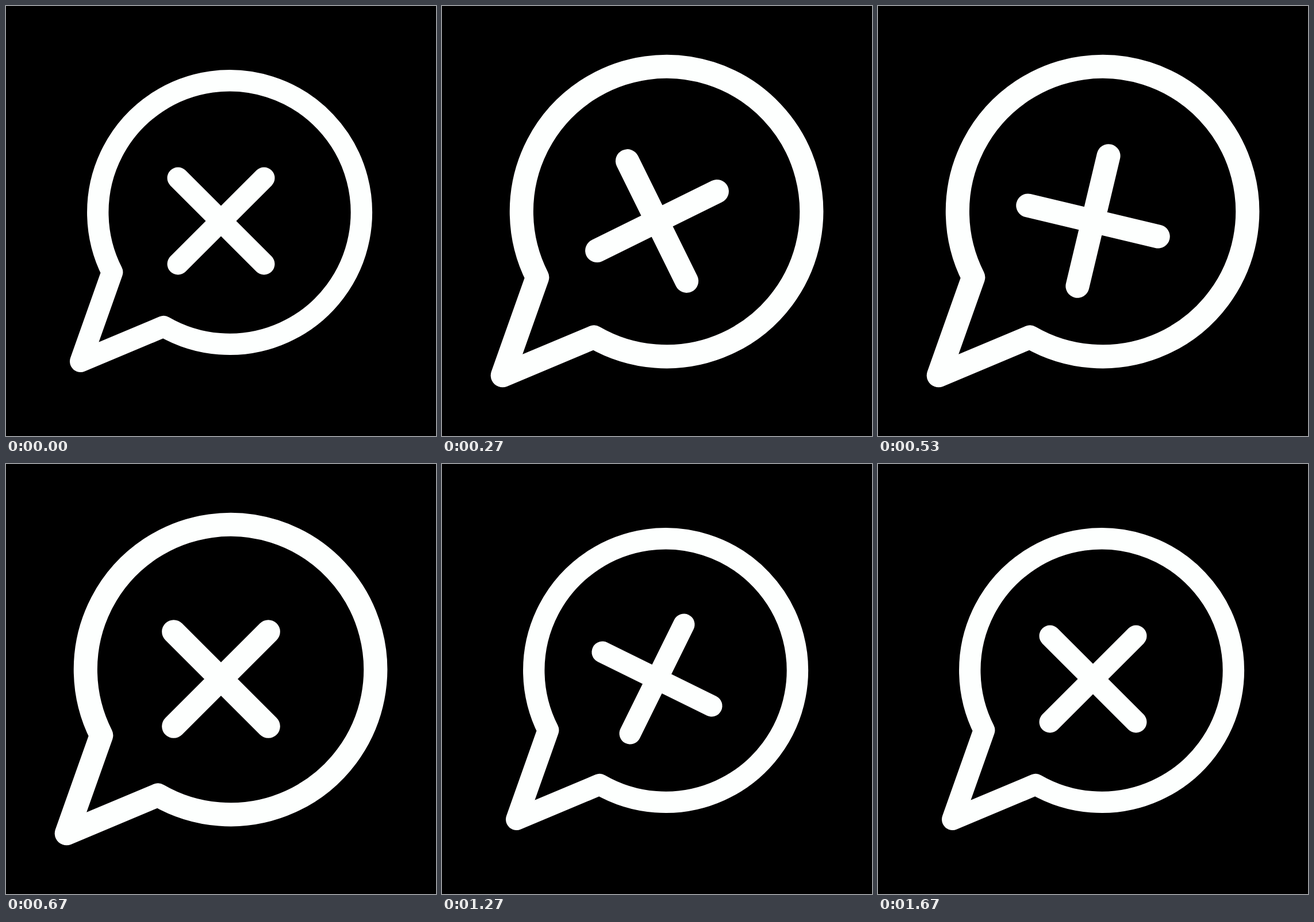
Animation, 748 px wide and 748 px high, one loop 2010 ms. Source, as an HTML page without scripts:

```html
<!DOCTYPE html>
<html lang="en">
<head>
<meta charset="utf-8">
<title>Dismiss message icon</title>
<style>
  /* Clock in ticks of 1/30 s; everything else follows from it */
  @property --tick {
    syntax: "<number>";
    inherits: true;
    initial-value: 0;
  }

  html, body {
    margin: 0;
    width: 100%;
    height: 100%;
    overflow: hidden;
    background: #000;
  }

  svg {
    display: block;
    width: 100%;
    height: 100%;
    fill: none;
    stroke: #fdfffe;
    stroke-width: 37.4;
    stroke-linecap: round;
    stroke-linejoin: round;
    animation: clock 2010ms -4ms infinite;
  }

  @keyframes clock {
    0% { --tick: 0; animation-timing-function: steps(60); }
    99.5025%, 100% { --tick: 60; }
  }

  .icon, .cross {
    transform-origin: 374px 374px;
    --ease: calc(var(--x) * var(--x) * (3 - 2 * var(--x)));
  }

  /* Grow in ticks 0-5, shrink in ticks 30-35 */
  .icon {
    --x: calc(clamp(0, var(--tick) / 5, 1) - clamp(0, (var(--tick) - 30) / 5, 1));
    transform: scale(calc(1 + 0.1 * var(--ease)));
  }

  /* Half turn in ticks 5-20, back in ticks 35-50 */
  .cross {
    --x: calc(clamp(0, (var(--tick) - 5) / 15, 1) - clamp(0, (var(--tick) - 35) / 15, 1));
    transform: rotate(calc(180deg * var(--ease)));
  }
</style>
</head>
<body>
<svg viewBox="0 0 748 748">
  <g class="icon">
    <path d="M274.3 557.6A229.3 229.3 0 1 0 184.7 463.1L129.7 618.3Z"/>
    <path class="cross" d="M299.2 299.2L448.8 448.8M448.8 299.2L299.2 448.8"/>
  </g>
</svg>
</body>
</html>
```
